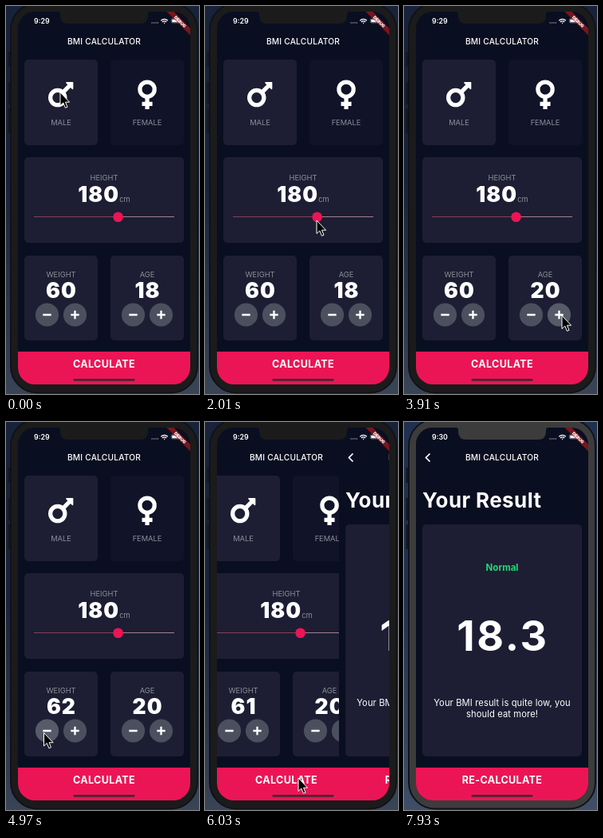
Animation, 242 px wide and 485 px high, one loop 8030 ms. Source, as an HTML page:

```html
<!DOCTYPE html>
<html lang="en">
<head>
<meta charset="utf-8">
<title>BMI calculator</title>
<style>
  html, body { margin: 0; width: 100%; height: 100%; overflow: hidden; background: #18223a; }
  svg { display: block; width: 242px; height: 485px; }
  text { font-family: Inter, "Open Sans", sans-serif; fill: #fff; }
  .mid { text-anchor: middle; }
  .label { font-size: 9.3px; fill: #8d8e98; letter-spacing: 0; }
  .title { font-size: 10.2px; font-weight: 500; letter-spacing: .2px; }
  .number { font-size: 26.5px; font-weight: 900; letter-spacing: 1.1px; }
  .action { font-size: 12.6px; font-weight: 700; letter-spacing: .3px; }
  .page { fill: #0a0e21; }
  .card { fill: #1d1e33; }
  .pink { fill: #eb1555; }
  .round { fill: #4c4f5e; }
  .round.down { fill: #575a68; }
  .sign { stroke: #fff; stroke-width: 2.35; stroke-linecap: square; }
</style>
</head>
<body>
<svg viewBox="0 0 242 485">
  <defs>
    <clipPath id="screen"><rect x="15" y="7" width="216" height="466" rx="21"/></clipPath>
    <linearGradient id="haze" x2="0" y2="1">
      <stop offset=".45" stop-color="#8a949c" stop-opacity="0"/>
      <stop offset="1" stop-color="#8a949c" stop-opacity=".3"/>
    </linearGradient>
  </defs>

  <rect id="desk" width="242" height="485"/>
  <rect width="242" height="485" fill="url(#haze)"/>
  <path d="M2.500 57h4v19h-4zM2.500 95h4v28h-4zM2.500 128h4v31h-4z" fill="#141821"/>
  <rect class="bezel" x="6" y="-3.500" width="234" height="487" rx="33" stroke="#101218" stroke-width="2"/>

  <g clip-path="url(#screen)">
    <g id="home">
      <rect class="page" x="15" y="7" width="216" height="467"/>
      <text class="title mid" x="123" y="48">BMI CALCULATOR</text>
      <rect class="card" x="23" y="67" width="92" height="107" rx="5"/>
      <rect x="131" y="67" width="92" height="107" rx="5" fill="#111328"/>
      <g fill="none" stroke="#fff" stroke-width="64">
        <g transform="translate(53 89.800) scale(.0816)">
          <circle cx="144" cy="304" r="112"/>
          <path d="M233 215 335 113"/>
          <path d="M282 74h92v92z" fill="#fff" stroke-width="20" stroke-linejoin="round"/>
        </g>
        <g transform="translate(165.300 89.800) scale(.0816)">
          <circle cx="144" cy="176" r="112"/>
          <path d="M144 300V480M64 400H224"/>
        </g>
      </g>
      <text class="label mid" x="69" y="148.500">MALE</text>
      <text class="label mid" x="177" y="148.500">FEMALE</text>

      <rect class="card" x="23" y="189" width="200" height="107" rx="5"/>
      <text class="label mid" x="123" y="218">HEIGHT</text>
      <text class="mid" x="123" y="245"><tspan class="number" id="height">180</tspan><tspan class="label">cm</tspan></text>
      <path d="M35 263.500H211" stroke="#a67f8f"/>
      <path id="track" stroke="#84405a"/>
      <g id="thumb" class="pink">
        <circle id="halo" r="13" opacity=".16"/>
        <circle r="6.300"/>
      </g>

      <g id="counters"></g>
      <rect class="pink" x="15" y="432" width="216" height="42"/>
      <text class="action mid" x="123" y="452">CALCULATE</text>
    </g>

    <g id="result">
      <rect class="page" x="15" y="7" width="216" height="467"/>
      <path d="M32.500 39.500l-5 5 5 5" fill="none" stroke="#fff" stroke-width="1.700"/>
      <text class="title mid" x="123" y="48">BMI CALCULATOR</text>
      <text x="23" y="106.500" font-size="26" font-weight="700" letter-spacing=".4">Your Result</text>
      <rect class="card" x="23" y="128" width="200" height="290" rx="5"/>
      <text class="mid" x="123" y="186" font-size="11.500" font-weight="700" style="fill:#24d876">Normal</text>
      <text class="mid" x="124" y="286" font-size="52" font-weight="700" letter-spacing="2.700">18.3</text>
      <g class="mid" font-size="11.200" letter-spacing=".1">
        <text x="123" y="355">Your BMI result is quite low, you</text>
        <text x="123" y="368.700">should eat more!</text>
      </g>
      <rect class="pink" x="15" y="432" width="216" height="42"/>
      <text class="action mid" x="123" y="452">RE-CALCULATE</text>
    </g>

    <path class="bezel" d="M65 7q3 0 3 3v2q0 10 10 10h90q10 0 10-10v-2q0-3 3-3z"/>
    <text id="clock" x="35" y="22" font-size="8.800" font-weight="600"></text>
    <path d="M182.500 21h8.500" stroke="#8d8e98" stroke-width="1.300" stroke-dasharray="1.300 1.100"/>
    <g fill="none" stroke="#fff" stroke-width="1.300">
      <path d="M194.300 18.200q4.300-3.700 8.600 0M195.900 20q2.700-2.200 5.400 0"/>
      <path d="M198 21.300h1.200"/>
      <rect x="207.300" y="16" width="10.500" height="5" rx="1.500" stroke="#999ba6" stroke-width=".6"/>
      <path d="M208.300 18.500h8.500" stroke-width="3.400"/>
    </g>
    <g transform="translate(231 7) rotate(45)">
      <rect x="-21" y="14.600" width="42" height="6.300" fill="#b71c1c" fill-opacity=".63"/>
      <text class="mid" y="19.700" font-size="5.300" font-weight="900">DEBUG</text>
    </g>
    <rect x="84.500" y="466" width="77" height="2.700" rx="1.350" fill="#452632"/>
  </g>

  <path id="cursor" d="M0 0V16.500L3.800 13 6.400 19.300 9 18.200 6.500 12.200H11.600Z" stroke="#fff" stroke-linejoin="round"/>
</svg>

<script>
const LOOP = 8030, STEP = 118.35;
const $ = id => document.getElementById(id);

// Rows are [step, values...]
const cursorKeys = [
  [-1, 68, 108], [3, 180, 136], [6, 180, 136], [9, 72, 139], [12, 72, 139],
  [16, 140, 268], [18, 140, 268], [19, 150, 269], [21, 175, 270], [24, 137, 267],
  [26, 181, 382], [28, 198, 387], [32, 198, 387], [35, 98, 396], [36, 99, 393],
  [37, 95, 392], [39, 47.5, 388.5], [42, 47.5, 388.5], [47, 117, 445]
];
const heightKeys = [[18, 180], [19, 186], [21, 200], [24, 180]];
const pushKeys = [[49, 0], [50, 7 / 24], [51, .875], [52, 1]];

function sample(keys, step) {
  const next = keys.findIndex(key => key[0] >= step);
  if (next <= 0) return keys[next ? keys.length - 1 : 0].slice(1);
  const a = keys[next - 1], b = keys[next];
  const u = (step - a[0]) / (b[0] - a[0]);
  const eased = u * u * (3 - 2 * u);
  return a.slice(1).map((v, i) => v + (b[i + 1] - v) * eased);
}

function counter(id, label, x) {
  const button = (dx, name, sign) => `
    <circle id="${id}${name}" class="round" cx="${x + dx}" cy="386" r="14.600"/>
    <path class="sign" transform="translate(${x + dx} 386)" d="${sign}"/>`;
  return `<rect class="card" x="${x - 46}" y="312" width="92" height="106" rx="5"/>
    <text class="label mid" x="${x}" y="338.500">${label}</text>
    <text class="number mid" id="${id}" x="${x + .5}" y="365"></text>
    ${button(-17.5, "Minus", "M-4 0H4")}${button(17.5, "Plus", "M-4 0H4M0-4V4")}`;
}
$("counters").innerHTML = counter("weight", "WEIGHT", 69) + counter("age", "AGE", 177);

const bezels = document.querySelectorAll(".bezel");
const move = (id, x, y) => $(id).setAttribute("transform", `translate(${x} ${y})`);
const press = (id, on) => $(id).classList.toggle("down", on);

function draw(time) {
  const step = Math.floor((time - 105) / STEP);
  const since = (...steps) => steps.filter(s => step >= s).length;
  const during = (from, to) => step >= from && step < to;

  const [height] = sample(heightKeys, step);
  const thumbX = 35 + (height - 120) * 1.76;
  $("height").textContent = Math.round(height);
  $("track").setAttribute("d", `M35 263.5H${thumbX}`);
  move("thumb", thumbX, 263.7);
  $("halo").style.display = during(18, 25) ? "" : "none";

  $("age").textContent = 18 + since(30, 32);
  $("weight").textContent = 60 + since(36, 37) - since(42);
  press("agePlus", during(28, 33));
  press("weightPlus", during(36, 38));
  press("weightMinus", during(41, 43));

  const [push] = sample(pushKeys, step);
  move("home", -72 * push, 0);
  move("result", 216 * (1 - push), 0);

  $("clock").textContent = step < 60 ? "9:29" : "9:30";
  const inactive = step >= 66;
  $("desk").setAttribute("fill", inactive ? "#203050" : "#18223a");
  bezels.forEach(part => part.setAttribute("fill", inactive ? "#3c3c3c" : "#1b1b1b"));

  move("cursor", ...sample(cursorKeys, step));
  $("cursor").style.opacity = 1 - since(55, 56) / 2;
}

const start = performance.now();
function tick() {
  draw((performance.now() - start) % LOOP);
  requestAnimationFrame(tick);
}
tick();
</script>
</body>
</html>
```
